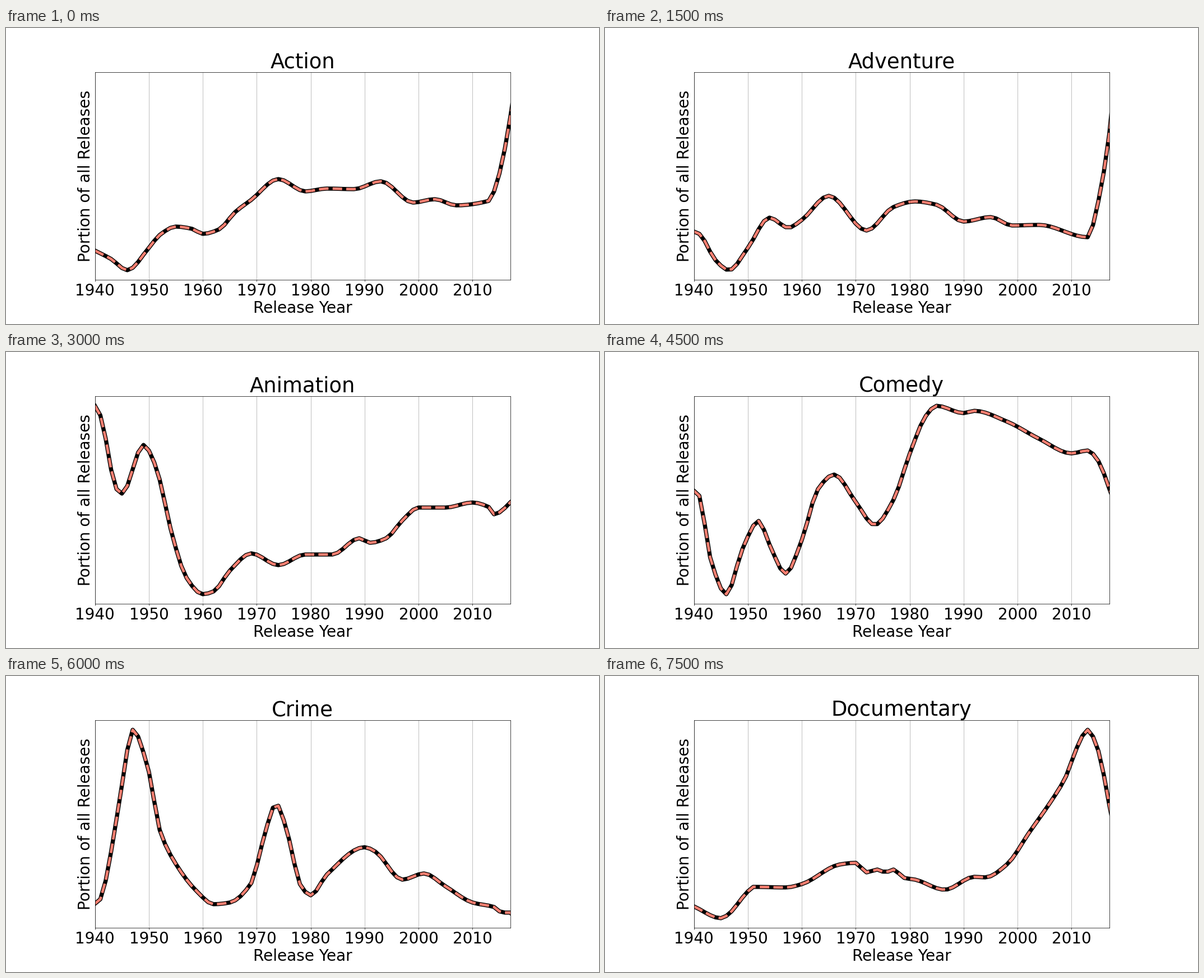
Animation, 1058 px wide and 529 px high, one loop 8 s. Source, as a matplotlib script:

```python
import matplotlib.pyplot as plt
import numpy as np
from matplotlib.animation import FuncAnimation

W, H, DPI = 1058, 529, 66.125
STEP_MS, STEPS, HOLD = 500, 16, 3
FIRST, LAST = 1940, 2017
PEAK = 337
SPAN = np.arange(LAST - FIRST + 2)


def trend(points):
    """Yearly values on a monotone cubic through {years since FIRST: height}."""
    x, y = (np.array(list(v), float) for v in (points.keys(), points.values()))
    gap = np.diff(x)
    rise = np.diff(y) / gap
    left, right = rise[:-1], rise[1:]
    same = left * right > 0
    inner = np.where(same, 2 * left * right / np.where(same, left + right, 1), 0)
    slope = np.concatenate([rise[:1], inner, rise[-1:]])

    k = np.clip(np.searchsorted(x, SPAN, side="right") - 1, 0, len(gap) - 1)
    t = (SPAN - x[k]) / gap[k]
    ease = t * t * (3 - 2 * t)
    bend = t * (1 - t) * ((1 - t) * slope[k] - t * slope[k + 1])
    return y[k] + (y[k + 1] - y[k]) * ease + gap[k] * bend


action = trend({
    0: 35, 3: 20, 6: 0, 10: 40, 12: 63, 15: 78, 18: 74, 20: 65, 23: 73,
    26: 104, 29: 126, 34: 163, 39: 141, 43: 146, 48: 145, 53: 159, 59: 121,
    63: 127, 67: 116, 73: 124, 75: 173, 77: 273, 78: 337})

adventure = trend({
    0: 69, 1: 65, 4: 18, 6.5: 0, 10: 40, 14: 94, 17.5: 76, 20: 90, 25: 133,
    32: 71, 37: 113, 41: 123, 45: 117, 50: 87, 55: 95, 59: 80, 64: 81,
    73: 59, 75: 124, 77: 243, 78: 337})

animated = trend({
    0: 337, 1: 320, 4: 188, 5: 180, 9: 267, 10: 257, 12: 205, 14: 118,
    17: 29, 20: 0, 22: 5, 25: 42, 29: 73, 34: 52, 39: 71, 44: 71, 49: 100,
    51: 92, 54: 100, 57: 132, 60: 155, 65: 155, 70: 164, 73: 156, 74: 143,
    78: 173})

comedy = trend({
    0: 185, 1: 176, 3: 66, 6: 0, 9: 81, 12: 131, 14: 89, 17: 37, 20: 97,
    23: 188, 26: 214, 30: 165, 33.5: 124, 37: 169, 40: 251, 43: 319, 45: 337,
    50: 324, 52: 328, 58: 309, 64: 278, 70: 252, 73: 257, 75: 238, 77: 189,
    78: 163})

crime = trend({
    0: 26, 1: 34, 3: 119, 5: 238, 7: 337, 10: 262, 12: 158, 15: 97, 19: 47,
    22: 25, 25: 28, 29: 63, 31: 133, 33.6: 204, 36: 141, 38: 61, 40: 41,
    43: 78, 50: 127, 52: 119, 57: 69, 61: 80, 65: 57, 70: 28, 74: 20,
    75.5: 10, 77: 10, 78: 0})

documentary = trend({
    0: 21, 5: 0, 6: 4, 10: 48, 11: 56, 17: 55, 20: 61, 27: 96, 30: 99,
    32: 82, 34: 87, 35.5: 82, 37: 87, 39: 72, 41: 69, 46.5: 51, 52: 74,
    54: 73, 58: 96, 62: 151, 68: 236, 69: 254, 71: 305, 73: 337, 75: 299,
    77: 203, 78: 155})

genres = [("Action", action), ("Adventure", adventure),
          ("Animation", animated), ("Comedy", comedy),
          ("Crime", crime), ("Documentary", documentary)]

plt.rcParams["font.family"] = "DejaVu Sans"
fig = plt.figure(figsize=(W / DPI, H / DPI), dpi=DPI, facecolor="white")
ax = fig.add_axes([0.15, 0.15, 0.7003, 0.7])
ax.set_xlim(FIRST, LAST)
ax.set_ylim(-0.05 * PEAK, 1.05 * PEAK)
ax.set_xticks(range(FIRST, LAST, 10))
ax.set_yticks([])
ax.tick_params(axis="x", labelsize=30.2)
ax.set_xlabel("Release Year", fontsize=30.3, labelpad=2.7)
ax.set_ylabel("Portion of all Releases", fontsize=30.3, labelpad=2.8)
ax.set_axisbelow(False)
ax.grid(axis="x", color="black", alpha=0.34, linewidth=0.8)
title = ax.set_title("", fontsize=40.2, pad=4.8)

outline, = ax.plot([], [], color="black", linewidth=8)
dashes, = ax.plot([], [], color="salmon", linewidth=5, linestyle="--")


def draw(step):
    name, values = genres[step // HOLD]
    title.set_text(name)
    outline.set_data(FIRST + SPAN, values)
    dashes.set_data(FIRST + SPAN, values)
    return title, outline, dashes


anim = FuncAnimation(fig, draw, frames=STEPS, interval=STEP_MS,
                     init_func=lambda: draw(0), repeat=True, repeat_delay=0)
plt.show()
```
